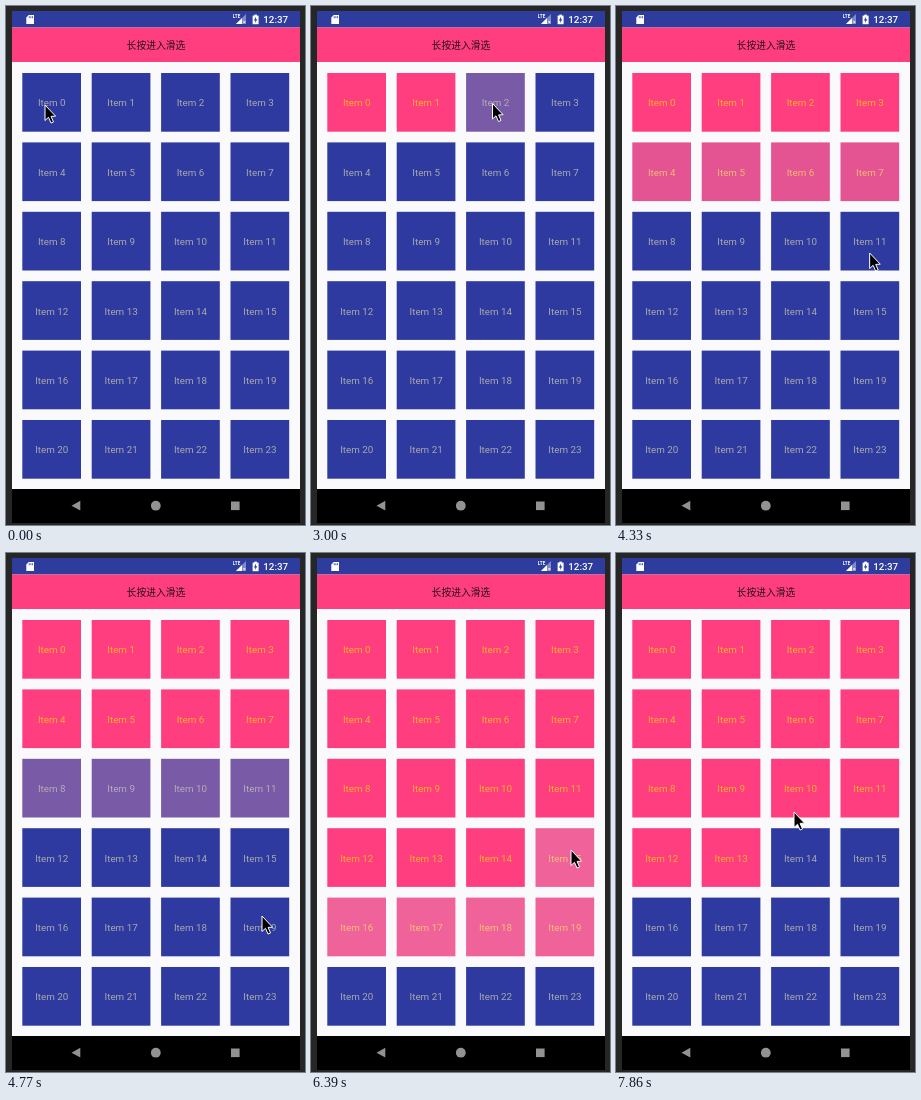
An HTML page with a canvas for the animation above (8000 ms loop, 299x519 px).

```html
<!DOCTYPE html>
<html lang="zh">
<head>
<meta charset="utf-8">
<style>
  html, body { margin: 0; width: 100%; height: 100%; overflow: hidden; background: #262626; }
  canvas { display: block; width: 299px; height: 519px; }
</style>
</head>
<body>
<canvas id="stage"></canvas>
<script>
const LOOP = 8000, W = 299, H = 519;
const canvas = document.getElementById('stage');
const ctx = canvas.getContext('2d');
const ratio = window.devicePixelRatio || 1;
canvas.width = W * ratio;
canvas.height = H * ratio;
ctx.scale(ratio, ratio);

const BLUE = '#2e3a9f', PINK = '#ff3e80';

// Tile looks: [fill, label]
const IDLE = [BLUE, '#a9a9ab'];
const SELECTED = [PINK, '#ffb127'];
const SELECTING = [['#785aa6', '#b5acb5'], ['#e45392', '#efbd6c']];
const DESELECTING = [['#f0629a', '#f5c074']];

// Selection changes: first item, last item, starting tick, fade stages, final look
const changes = [
  [0, 0, 13, [], SELECTED],
  [1, 1, 18, SELECTING, SELECTED],
  [2, 2, 20, SELECTING, SELECTED],
  [3, 3, 24, SELECTING, SELECTED],
  [4, 7, 28, SELECTING, SELECTED],
  [8, 11, 32, SELECTING, SELECTED],
  [12, 15, 33, SELECTING, SELECTED],
  [16, 19, 34, SELECTING, SELECTED],
  [15, 19, 43, DESELECTING, IDLE],
  [14, 14, 51, DESELECTING, IDLE],
];

// Pointer keys: tick, x, y
const pointerKeys = [
  [0, 39, 99], [1, 39, 99], [2, 39, 90], [4, 39, 96], [14, 39, 96],
  [22, 229, 98], [24, 243, 108], [27, 251, 159], [30, 255, 291],
  [32, 256, 363], [34, 257, 389], [35, 257, 392], [37, 257, 392],
  [42, 260, 302], [43, 260, 297], [44, 260, 296], [45, 260, 296],
  [53, 178, 259], [54, 178, 259],
];

function tickAt(ms) {
  return ms < 2255 ? Math.min(14, Math.floor((ms + 14) / 151))
                   : 15 + Math.floor((ms - 2255) / 147.4);
}

function pointerAt(tick) {
  const next = Math.max(1, pointerKeys.findIndex(key => key[0] >= tick));
  const [t0, x0, y0] = pointerKeys[next - 1];
  const [t1, x1, y1] = pointerKeys[next];
  const p = (tick - t0) / (t1 - t0);
  return [x0 + (x1 - x0) * p, y0 + (y1 - y0) * p];
}

function lookAt(item, tick) {
  let look = IDLE;
  for (const [first, last, start, stages, end] of changes) {
    if (item >= first && item <= last && tick >= start) look = stages[tick - start] || end;
  }
  return look;
}

function rect(x, y, w, h, color) {
  ctx.fillStyle = color;
  ctx.fillRect(x, y, w, h);
}

function shape(points, color) {
  ctx.beginPath();
  points.forEach(([x, y]) => ctx.lineTo(x, y));
  ctx.closePath();
  ctx.fillStyle = color;
  ctx.fill();
}

function label(text, x, y, color, font, align = 'center') {
  ctx.font = font;
  ctx.textAlign = align;
  ctx.fillStyle = color;
  ctx.fillText(text, x, y);
}

function drawStatusBar() {
  rect(6, 5, 288, 16.5, '#2e3c9e');
  // Memory card
  shape([[22.7, 9], [28, 9], [28, 18], [20.3, 18], [20.3, 11.5]], '#fff');
  for (let i = 0; i < 3; i++) rect(22.8 + i * 1.7, 10.2, 0.8, 2, '#2e3c9e');
  // Mobile signal
  shape([[230, 18], [240, 8], [240, 18]], 'rgba(255,255,255,.4)');
  shape([[230, 18], [236, 12], [236, 18]], '#fff');
  label('LTE', 226.8, 12, '#fff', '700 4.6px Roboto, sans-serif', 'left');
  label('×', 238.3, 18.3, '#fff', '700 5px Roboto, sans-serif');
  // Charging battery
  rect(248.3, 8.6, 2.6, 1.4, '#fff');
  rect(246.6, 9.6, 6, 8.6, '#fff');
  shape([[250.1, 10.6], [247.9, 14.4], [249.3, 14.4], [249.1, 17],
         [251.3, 13.2], [249.9, 13.2]], '#2e3c9e');
  label('12:37', 257.3, 17, '#fff', '500 9.8px Roboto, sans-serif', 'left');
}

function drawNavigation() {
  const gray = '#929292';
  rect(6, 483, 288, 34, '#000');
  shape([[65.5, 499.7], [74.3, 494.8], [74.3, 504.6]], gray);
  ctx.beginPath();
  ctx.arc(149.8, 499.7, 4.9, 0, Math.PI * 2);
  ctx.fill();
  rect(225, 495.5, 8.6, 8.6, gray);
}

function drawTiles(tick) {
  for (let item = 0; item < 24; item++) {
    const x = 16.3 + 69.4 * (item % 4);
    const y = 67 + 69.4 * Math.floor(item / 4);
    const [fill, ink] = lookAt(item, tick);
    rect(x, y, 58.7, 58.7, fill);
    label('Item ' + item, x + 29.4, y + 33.3, ink, '9.8px Roboto, sans-serif');
  }
}

function drawPointer(x, y) {
  ctx.save();
  ctx.translate(x, y);
  shape([[0, 0], [0, 15.5], [3.5, 12.3], [6, 18], [8.5, 17], [6.1, 11.4], [10.6, 11.2]], '#000');
  ctx.strokeStyle = '#fff';
  ctx.lineWidth = 1;
  ctx.stroke();
  ctx.restore();
}

function draw(now) {
  const tick = tickAt(now % LOOP);
  rect(0, 0, W, H, '#262626');
  rect(6, 5, 288, 512, '#fafafc');
  drawStatusBar();
  rect(6, 21.5, 288, 34.5, PINK);
  label('长按进入滑选', 150, 42.6, '#2a1119', '9.8px "Noto Sans CJK SC", "Noto Sans CJK", sans-serif');
  drawTiles(tick);
  drawNavigation();
  drawPointer(...pointerAt(tick));
}

const start = performance.now();
function loop() {
  draw(performance.now() - start);
  requestAnimationFrame(loop);
}
loop();
</script>
</body>
</html>
```
